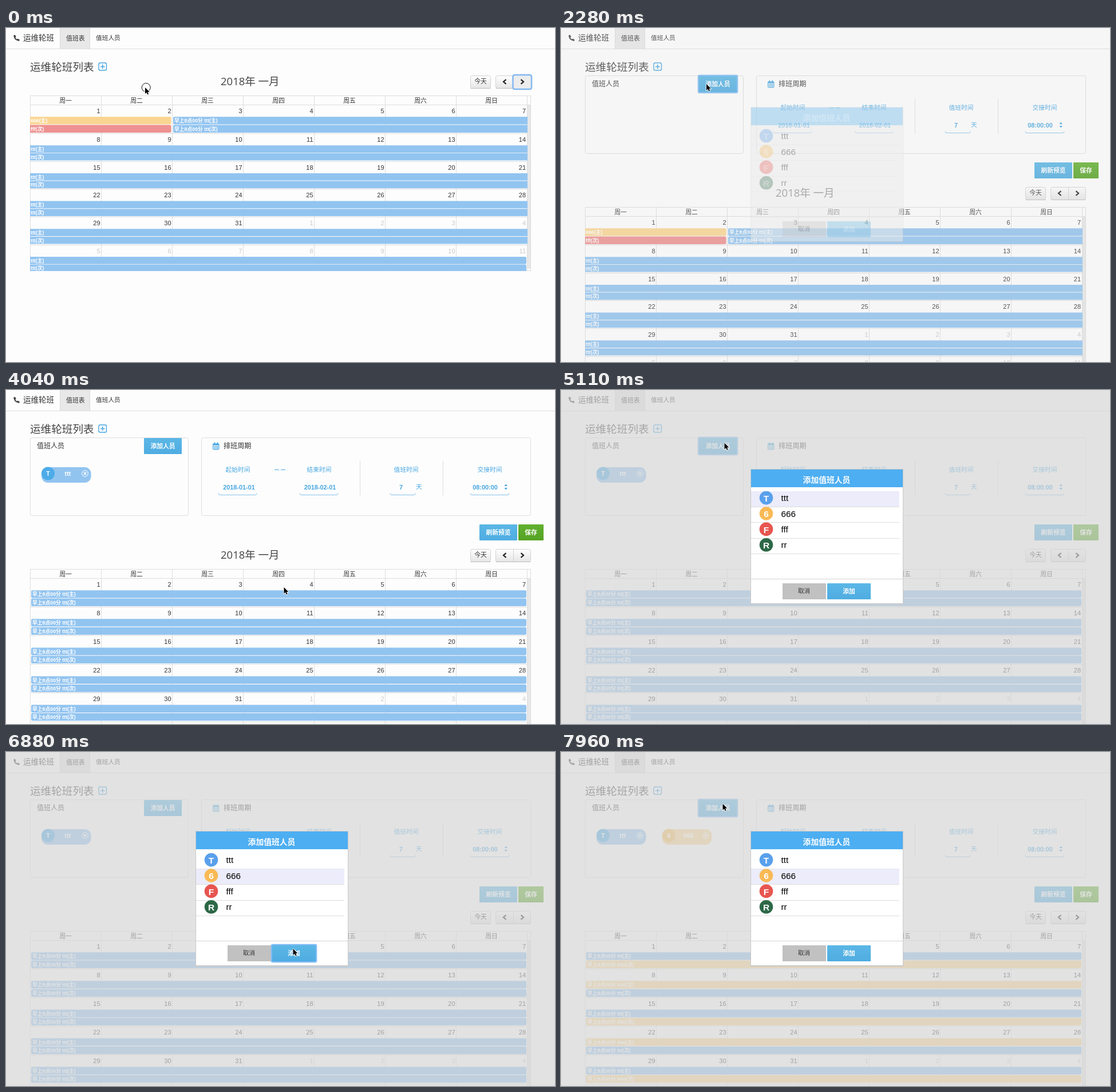
An HTML page with a canvas that plays this animation: 959 by 584 pixels, repeating every 8 s.

```html
<!DOCTYPE html>
<html lang="zh-CN">
<head>
<meta charset="utf-8">
<title>运维轮班</title>
<style>
html, body { margin: 0; width: 100%; height: 100%; overflow: hidden; background: #fdfdfd; }
canvas { display: block; }
</style>
</head>
<body>
<canvas id="stage" width="959" height="584"></canvas>
<script>
const LOOP = 8000;
const ctx = document.getElementById('stage').getContext('2d');
const SANS = '"Liberation Sans", "Noto Sans CJK SC", "Noto Sans CJK", sans-serif';
const OPEN = '"Open Sans", "Noto Sans CJK SC", "Noto Sans CJK", sans-serif';
const BLUE = '#45a6e2', LINE = '#dddddd', INK = '#333';
const SKY = ['#5bb7e6', '#4facE1'], GREEN = ['#62b030', '#55a324'];
const PEOPLE = [
  { name: 'ttt', bar: '#92c4f0', dot: '#4dabe8', avatar: '#5aa0ec' },
  { name: '666', bar: '#fad592', dot: '#f6bd5c', avatar: '#f9ba55' },
  { name: 'fff', bar: '#ee9191', dot: '#e8554f', avatar: '#e8554f' },
  { name: 'rr', bar: '#7da58e', dot: '#2d6847', avatar: '#2d6847' }
];

// Cursor path: time, x, y
const PATH = [
  [0, 243, 104], [370, 243, 104], [870, 169.5, 66], [1710, 169.5, 66],
  [1770, 183, 72], [1870, 183, 72], [2200, 254, 98], [2530, 254, 98],
  [2580, 266, 109], [2710, 266, 109], [3070, 424.5, 194.5], [3200, 424.5, 194.5],
  [3520, 503, 350], [3640, 503, 350], [4040, 485.5, 345], [4190, 485.5, 345],
  [4930, 285.5, 92.5], [5260, 285.5, 92.5], [5720, 430, 211], [5920, 430, 211],
  [6060, 452, 300], [6100, 452, 300], [6700, 501.5, 344], [7200, 501.5, 344],
  [7240, 499.5, 343.5], [7330, 499.5, 343.5], [7840, 282.5, 90.5], [LOOP, 282.5, 90.5]
];
const RINGS = [[0, 60], [1170, 1350], [2200, 2280], [4930, 5050], [7840, 7900]];
const ADD_FOCUS = [[2200, 3070], [4930, 5780], [7840, LOOP]];
const OK_FOCUS = [[3570, 3640], [6700, 6940]];
const DIALOG = [[2280, 3640], [5050, 6940], [7900, LOOP]];

const find = (spans, t) => spans.find(([a, b]) => t >= a && t < b);

function cursorAt(t) {
  const i = Math.max(1, PATH.findIndex(k => k[0] > t));
  const [t0, x0, y0] = PATH[i - 1], [t1, x1, y1] = PATH[i];
  const u = (t - t0) / (t1 - t0), e = u * u * (3 - 2 * u);
  return { x: x0 + (x1 - x0) * e, y: y0 + (y1 - y0) * e };
}

// Text is placed by its visual middle.
function text(s, x, y, size, color = INK, align = 'left', weight = 'normal', font = SANS) {
  ctx.font = `${weight} ${size}px ${font}`;
  ctx.textAlign = align;
  ctx.fillStyle = color;
  ctx.fillText(s, x, y + size * 0.37);
}

function rect(x, y, w, h, color) {
  ctx.fillStyle = color;
  ctx.fillRect(x, y, w, h);
}

function round(x, y, w, h, r, fill, stroke, width = 1) {
  ctx.beginPath();
  ctx.roundRect(x, y, w, h, r);
  if (fill) { ctx.fillStyle = fill; ctx.fill(); }
  if (stroke) { ctx.strokeStyle = stroke; ctx.lineWidth = width; ctx.stroke(); }
}

function disc(x, y, r, fill, stroke) {
  round(x - r, y - r, 2 * r, 2 * r, r, fill, stroke);
}

function path(points, color, width, fill) {
  ctx.beginPath();
  points.forEach(([x, y]) => ctx.lineTo(x, y));
  if (fill) { ctx.closePath(); ctx.fillStyle = fill; ctx.fill(); }
  if (color) { ctx.strokeStyle = color; ctx.lineWidth = width; ctx.stroke(); }
}

function shade(y, h, [top, bottom]) {
  const g = ctx.createLinearGradient(0, y, 0, y + h);
  g.addColorStop(0, top);
  g.addColorStop(1, bottom);
  return g;
}

function button(x, y, w, h, label, colors, focus) {
  if (focus) round(x - 1, y - 1, w + 2, h + 2, 2, null, '#7fbcf5', 2.5);
  round(x, y, w, h, 1, shade(y, h, colors));
  text(label, x + w / 2, y + h / 2, 10.8, '#fff', 'center', 'bold');
}

function header() {
  rect(94, 0, 53, 36, '#e8e8e8');
  rect(94, 0, 1, 36, '#dadada');
  rect(146, 0, 1, 36, '#dadada');
  rect(0, 36, 959, 1, LINE);
  ctx.strokeStyle = '#444';
  ctx.lineCap = 'round';
  ctx.lineWidth = 2.2;
  ctx.beginPath();
  ctx.moveTo(14.5, 14);
  ctx.quadraticCurveTo(15, 20.5, 22, 21.5);
  ctx.stroke();
  ctx.lineWidth = 3;
  path([[15, 13.5], [16, 15.2]], '#444', 3);
  path([[20.6, 20.4], [22.2, 21.2]], '#444', 3);
  ctx.lineCap = 'butt';
  text('运维轮班', 30, 17, 13.5);
  text('值班表', 105, 17.5, 10.9);
  text('值班人员', 157, 17.5, 10.7);
  text('运维轮班列表', 42, 68, 18.6, '#444');
  round(162, 61, 13.5, 13, 2.5, null, BLUE, 1.4);
  rect(165, 66.8, 7.6, 1.5, BLUE);
  rect(168, 63.7, 1.5, 7.6, BLUE);
}

function chip(p, x) {
  round(x, 135, 86.5, 27, 11, p.bar);
  disc(x + 11.5, 146, 11.5, p.dot);
  text(p.name[0].toUpperCase(), x + 11.5, 146, 10.5, '#fff', 'center', 'bold');
  text(p.name, x + 46, 146, 10.8, '#fff', 'center', 'bold');
  const cx = x + 76;
  disc(cx, 146, 5.3, null, '#fff');
  path([[cx - 2.2, 143.8], [cx + 2.2, 148.2]], '#fff', 1.4);
  path([[cx + 2.2, 143.8], [cx - 2.2, 148.2]], '#fff', 1.4);
}

function field(label, lx, value, vx, x, w) {
  text(label, lx, 139, 10.7, BLUE, 'center');
  text(value, vx, 169.5, 10.9, BLUE, 'center', 'bold');
  ctx.beginPath();
  ctx.moveTo(x, 180.5);
  ctx.quadraticCurveTo(x, 183.5, x + 3, 183.5);
  ctx.lineTo(x + w - 3, 183.5);
  ctx.quadraticCurveTo(x + w, 183.5, x + w, 180.5);
  ctx.strokeStyle = '#86c3ea';
  ctx.lineWidth = 1;
  ctx.stroke();
}

function panels(chips, focus) {
  round(42.5, 83.5, 276, 136, 3, null, LINE);
  round(341.5, 83.5, 575, 136, 3, null, LINE);
  text('值班人员', 54, 98, 12);
  button(241, 84, 66, 28, '添加人员', SKY, focus);
  for (let i = 0; i < chips; i++) chip(PEOPLE[i], 62 + i * 114.8);

  round(361.5, 94, 10.5, 10, 1, null, BLUE);
  rect(361.5, 94, 10.5, 2.5, BLUE);
  for (const x of [363.5, 368.5]) rect(x, 91.5, 1.8, 3.5, BLUE);
  for (let i = 1; i < 4; i++) {
    rect(361.5 + i * 2.6, 97, 0.7, 7, BLUE);
    rect(361.5, 96 + i * 2.2, 10.5, 0.6, BLUE);
  }
  text('排班周期', 380, 98, 12.1);
  field('起始时间', 405, '2018-01-01', 407, 371, 67);
  field('结束时间', 547, '2018-02-01', 548.5, 513, 67);
  field('值班时间', 699, '7', 690, 671, 44);
  field('交接时间', 845, '08:00:00', 837, 811, 68);
  rect(469, 139, 8, 1, BLUE);
  rect(480, 139, 8, 1, BLUE);
  text('天', 716, 169.5, 10.7, BLUE);
  path([[870.5, 168], [873.2, 164.5], [876, 168]], null, 0, BLUE);
  path([[870.5, 171], [873.2, 174.5], [876, 171]], null, 0, BLUE);
  rect(618, 124, 1, 60, LINE);
  rect(763, 124, 1, 60, LINE);
  button(827, 235, 66, 28, '刷新预览', SKY);
  button(895, 235, 44, 28, '保存', GREEN);
}

function bar(x, y, x2, h, radii, who, role, timed) {
  const p = PEOPLE[who];
  round(x, y, x2 - x, h, radii, p.bar);
  const label = (timed ? '早上8点00分 ' : '') + p.name + (role ? '(次)' : '(主)');
  text(label, x + (timed ? 2 : 1), y + h / 2 + 0.2, 8.8, '#fff', 'left', 'bold');
}

function toolbar(oy, focus) {
  text('2018年 一月', 375, 93 + oy, 18.5, '#444', 'left', 'normal', OPEN);
  const fill = shade(83 + oy, 22, ['#ffffff', '#e6e6e6']);
  round(811.5, 83.5 + oy, 35, 22, 3, fill, '#d2d2d2');
  round(855.5, 83.5 + oy, 61, 22, 3, fill, '#d2d2d2');
  rect(811.5, 105 + oy, 35, 1, '#bcbcbc');
  rect(856, 105 + oy, 60, 1, '#bcbcbc');
  rect(886, 84 + oy, 1, 21, '#d2d2d2');
  if (focus) round(885.5, 82 + oy, 32.5, 25, 3, '#ececec', '#82b8f0', 2.5);
  text('今天', 829, 93.5 + oy, 10.8, INK, 'center');
  const y = 94 + oy;
  path([[873.5, y - 3.8], [869, y], [873.5, y + 3.8]], '#222', 2.2);
  path([[899.5, y - 3.8], [904, y], [899.5, y + 3.8]], '#222', 2.2);
}

// members: 0 shows the saved roster, otherwise the preview with that many people
function calendar(oy, members, focus) {
  toolbar(oy, focus);
  const top = 118 + oy, body = top + 17;
  const bottom = members ? 600 : 424 + oy;
  const colX = c => 42 + c * 124;
  const rowY = r => members ? body + r * 50.1 : body + (r && 50 + (r - 1) * 48.7);
  ctx.save();
  ctx.beginPath();
  ctx.rect(42, top, 876, bottom - top + 1);
  ctx.clip();

  rect(911, body, 6, bottom - body - 3, '#e7e7e7');
  for (let c = 0; c < 7; c++) {
    rect(colX(c), top, 1, bottom - top, LINE);
    text('周' + '一二三四五六日'[c], colX(c) + 62, top + 9, 10.8, INK, 'center');
  }
  rect(910, top, 1, bottom - top, LINE);
  rect(916, top, 1, bottom - top, LINE);
  rect(42, top, 875, 1, LINE);
  rect(42, bottom, 875, 1, LINE);

  for (let r = 0; r < 6; r++) {
    const y = rowY(r);
    rect(42, Math.round(y) - 1, r ? 869 : 875, 1, LINE);
    for (let c = 0; c < 7; c++) {
      const n = r * 7 + c;
      text(n % 31 + 1, colX(c + 1) - 1.5 - (c === 6 ? 0.5 : 0), y + 10, 11, n > 30 ? '#c8c8c8' : '#333', 'right');
    }
    const tall = members || !r;
    for (let k = 0; k < 2; k++) {
      const by = y + 20.2 + k * (tall ? 14.4 : 13.6), h = tall ? 13.3 : 12.7;
      if (members) {
        bar(44, by, 909, h, 2, members > 1 ? (r + k) % 2 : 0, k, true);
      } else if (!r) {
        bar(42, by, 288.5, h, [0, 2, 2, 0], k + 1, k);
        bar(292, by, 911, h, [2, 0, 0, 2], 0, k, true);
      } else {
        const last = r === 5;
        bar(42, by, last ? 909 : 911, h, last ? [0, 2, 2, 0] : 0, 0, k);
      }
    }
  }
  ctx.restore();
}

function dialog(alpha, selected, hover, focus) {
  ctx.globalAlpha = alpha * 0.67;
  rect(0, 0, 959, 584, '#d6d6d6');
  ctx.globalAlpha = alpha;
  rect(331, 138, 267, 237, '#c9c9c9');
  rect(332, 139, 265, 234, '#fff');
  rect(332, 139, 265, 31, '#4daef2');
  text('添加值班人员', 464, 157, 13.8, '#fff', 'center', 'bold');
  PEOPLE.forEach((p, i) => {
    const y = 177 + i * 27.4, mid = y + 11.6;
    if (i === selected || i === hover) rect(332, y, 259, 27.4, '#ececfb');
    rect(332, Math.round(y + 27), 259, 1, LINE);
    disc(358.5, mid, 11.8, p.avatar);
    text(p.name[0].toUpperCase(), 358.5, mid + 0.4, 15.5, '#fff', 'center', 'bold');
    text(p.name, 384.5, mid, 15.3, '#000');
  });
  rect(332, 330, 265, 1, '#d4d4d4');
  rect(387, 338, 76, 28, '#c1c1c1');
  text('取消', 424.5, 351.5, 10.6, INK, 'center');
  button(465, 338, 76, 28, '添加', SKY, focus);
  ctx.globalAlpha = 1;
}

function arrow(x, y) {
  const shape = [[0, 0], [0, 11], [2.6, 8.7], [4.3, 12.6], [6.1, 11.8], [4.5, 8.1], [7.9, 8]];
  const pts = shape.map(([a, b]) => [x + a, y + b]);
  path([...pts, pts[0]], '#fff', 1.6);
  path(pts, null, 0, '#000');
}

function hand(x, y) {
  ctx.save();
  ctx.translate(x, y);
  const p = new Path2D('M-1.3 1.2Q0-.4 1.3 1.2V5.2Q2.5 4.4 3.4 5.6Q4.6 5 5.4 6.1Q7.4 5.8 7.4 7.6V9.5L6.2 13H.6L-3.4 8.6Q-3.4 6.8-1.3 8.3Z');
  ctx.fillStyle = '#fff';
  ctx.fill(p);
  ctx.strokeStyle = '#000';
  ctx.lineWidth = 1.1;
  ctx.stroke(p);
  for (const k of [1.6, 3.5, 5.4]) path([[k, 8.6], [k, 11]], '#000', 0.7);
  ctx.restore();
}

function draw(t) {
  const { x, y } = cursorAt(t);
  const open = find(DIALOG, t);
  const hover = open && x > 332 && x < 591 && y > 177 && y < 286 ? Math.floor((y - 177) / 27.4) : -1;
  const selected = t < 3070 ? -1 : t < 5780 ? 0 : 1;
  const expanded = t >= 1260;
  const members = t < 3640 ? 0 : t < 6940 ? 1 : 2;

  rect(0, 0, 959, 584, '#fdfdfd');
  header();
  if (expanded) panels(members, find(ADD_FOCUS, t));
  calendar(expanded ? 195 : 0, members, t < 1170);
  if (open) dialog(Math.min(1, (t - open[0] + 20) / 70), selected, hover, find(OK_FOCUS, t));

  const onPlus = x > 160 && x < 178 && y > 58 && y < 76;
  if (find(RINGS, t)) disc(x + 1.7, y, 7.5, null, '#111');
  if (hover >= 0 || onPlus) hand(x, y);
  else arrow(x, y);
}

const start = performance.now();
function tick() {
  draw((performance.now() - start) % LOOP);
  requestAnimationFrame(tick);
}
tick();
</script>
</body>
</html>
```
